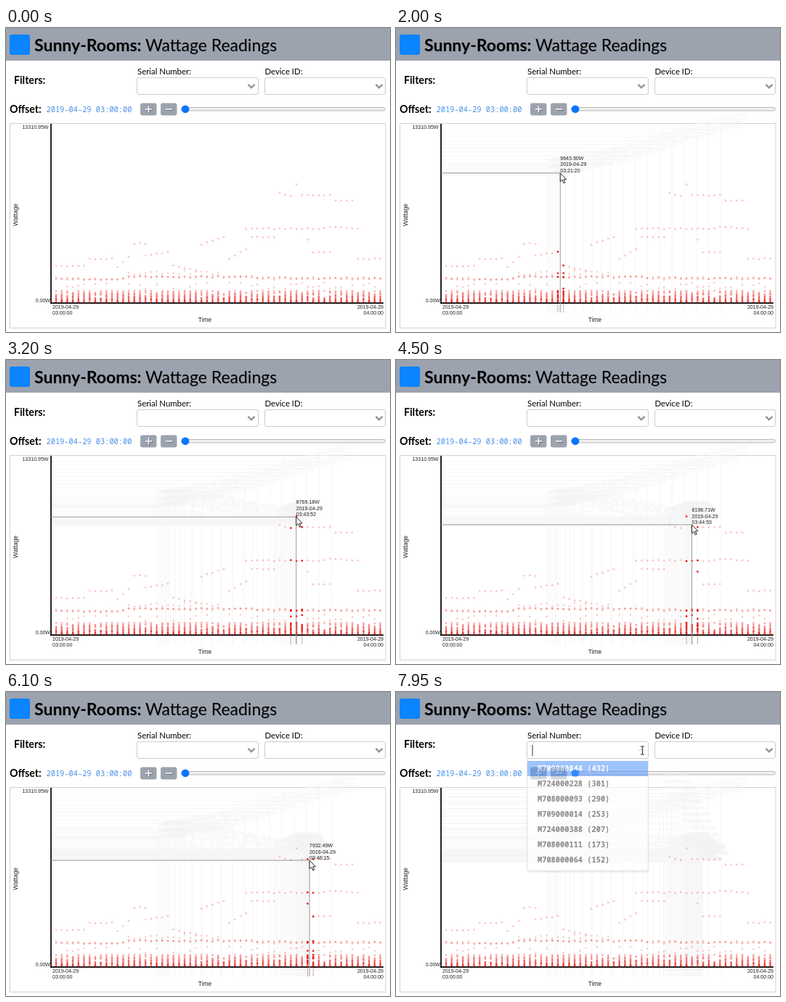
Write an HTML page that moves like this. It is 529 px wide and 419 px high and loops after 8000 ms.

```html
<!DOCTYPE html>
<html lang="en">
<head>
<meta charset="utf-8">
<title>Wattage Readings</title>
<style>
  html, body { margin: 0; width: 100%; height: 100%; overflow: hidden; background: #fff; }
  svg { display: block; width: 529px; height: 419px; }
  text { font-family: Lato, sans-serif; white-space: pre; }
  .mono { font-family: "Noto Sans Mono", monospace; font-size: 10.35px; }
  .tiny { font-family: "Liberation Sans", Arial, sans-serif; font-size: 7.05px; fill: #222; }
  .axis { font-family: "Liberation Sans", Arial, sans-serif; font-size: 8.4px; fill: #222; }
  .end { text-anchor: end; }
  .middle { text-anchor: middle; }
  .head { font-size: 14.2px; font-weight: 700; }
  .name { font-size: 11.4px; }
  .box { fill: #fff; stroke: #ccc; }
  .chevron { fill: none; stroke: #959595; stroke-width: 2.5; }
  .title { font-size: 23px; text-shadow: 1px 1px 0 rgba(0, 0, 0, .12); }
  .button { fill: #9ca3af; }
  .plus { stroke: #fff; stroke-width: 1.6; filter: drop-shadow(1px 1px 0 rgba(0, 0, 0, .4)); }
  .trail path { fill: none; stroke: #f6f6f6; }
  .trail text { fill: #f3f3f3; }
  .column circle { fill: #f01414; }
  .column path { stroke: #c9aaaa; visibility: hidden; }
  .column.on circle { opacity: 1; }
  .column.on path { visibility: visible; }
</style>
</head>
<body>
<svg viewBox="0 0 529 419">
  <rect width="529" height="45" fill="#9ca3af"/>
  <rect x="5" y="9" width="28" height="28" rx="3" fill="#0a84ff"/>
  <text class="title" x="39" y="31.5" font-weight="700">Sunny-Rooms:</text>
  <text class="title" x="192" y="31.5">Wattage Readings</text>

  <text class="head" x="11" y="77">Filters:</text>
  <text class="name" x="181" y="64">Serial Number:</text>
  <text class="name" x="356.5" y="64">Device ID:</text>
  <rect class="box" x="180.5" y="68.5" width="167" height="23" rx="2.5"/>
  <rect class="box" x="356.5" y="68.5" width="166" height="23" rx="2.5"/>
  <g transform="translate(338 80)"><path id="chevron" class="chevron" d="M-4.5-2.2L0 2.3L4.5-2.2"/></g>
  <path class="chevron" d="M509.5 77.8L514 82.3L518.5 77.8"/>

  <text class="head" x="5" y="117">Offset:</text>
  <text class="mono" x="55.5" y="115.5" fill="#4a90e8">2019-04-29 03:00:00</text>
  <rect class="button" x="185" y="103.5" width="22.5" height="17" rx="3"/>
  <rect class="button" x="213" y="103.5" width="22.5" height="17" rx="3"/>
  <path class="plus" d="M192 112h9M196.5 107.5v9M220 112h9"/>
  <rect x="241.5" y="109.5" width="281" height="4.5" rx="2.25" fill="#efefef" stroke="#b8b8b8"/>
  <circle cx="247" cy="111.8" r="5.4" fill="#0a75ff"/>

  <rect x="5.5" y="131.5" width="517.5" height="282" fill="#fff" stroke="#d3d3d3"/>
  <g id="trails"></g>
  <path d="M62 132V380M61 379.2H520" fill="none" stroke="#000" stroke-width="1.7"/>
  <g id="columns"></g>
  <text class="tiny end" x="58.5" y="139">13310.95W</text>
  <text class="tiny end" x="61" y="378">0.00W</text>
  <text class="tiny" x="64" y="386.5">2019-04-29</text>
  <text class="tiny" x="64" y="395">03:00:00</text>
  <text class="tiny end" x="520" y="386.5">2019-04-29</text>
  <text class="tiny end" x="520" y="395">04:00:00</text>
  <text class="axis middle" transform="translate(15.5 257.5) rotate(-90)">Wattage</text>
  <text class="axis middle" x="274" y="405">Time</text>

  <g id="cross"></g>
  <g id="menu">
    <rect x="181" y="94" width="167" height="155" rx="3" opacity=".1"/>
    <rect class="box" x="180.5" y="91.5" width="167" height="155" rx="2.5"/>
    <rect x="181" y="95" width="166" height="21" fill="#5897fb"/>
  </g>
  <path id="caret" d="M188 73V88" stroke="#333"/>
  <path id="arrow" d="M0 0V12L2.8 9.4L4.8 14L6.6 13.2L4.7 8.8H8.4Z" fill="#fff" stroke="#111" stroke-width=".9"/>
  <path id="beam" d="M-2.5-5.5H2.5M0-5V5M-2.5 5.5H2.5" fill="none" stroke="#222"/>
</svg>
<script>
const LOOP = 8000, STEP = 50, MAX = 13310.95, ENTER = 350, OPEN = 7800;
const $ = id => document.getElementById(id);
const show = (el, on) => { el.style.display = on ? "" : "none"; };
const add = (parent, tag, attrs, text = "") => {
  const el = document.createElementNS("http://www.w3.org/2000/svg", tag);
  for (const key in attrs) el.setAttribute(key, attrs[key]);
  el.textContent = text;
  return parent.appendChild(el);
};

// Pointer moves: start ms, end ms, then the goal in seconds after 03:00 and watts.
const moves = [
  [350, 550, 3008, 12832], [550, 1000, 1819, 10366.5], [1000, 1350, 1138, 9477],
  [1650, 2000, 1280, 9643.9], [2000, 2500, 2392, 8146], [2500, 3200, 2632, 8769.18],
  [4050, 4500, 2693, 8198.71], [5150, 5650, 2758, 7932.49], [5950, 6100, 2775, 7932.49],
  [6100, 6350, 2809, 7773], [6900, 7750, 2158, 16026]
];

function pointAt(t) {
  let sec = 3577, watts = 16559;
  for (const [from, to, s, w] of moves) {
    const k = Math.min(1, Math.max(0, (t - from) / (to - from)));
    sec += (s - sec) * k;
    watts += (w - watts) * k;
  }
  return { sec, watts, x: 62 + sec * .12833, y: 131 + (MAX - watts) / 53.25 };
}

const inside = (t, p) => t >= ENTER && p.y > 132;
const two = n => String(Math.floor(n)).padStart(2, "0");

function drawCross(el, p, stroke) {
  el.replaceChildren();
  add(el, "path", { d: `M62 ${p.y}H${p.x}V392`, fill: "none", stroke });
  [p.watts.toFixed(2) + "W", "2019-04-29", `03:${two(p.sec / 60)}:${two(p.sec % 60 + .001)}`]
    .forEach((line, i) => add(el, "text", { class: "tiny", x: p.x, y: p.y - 18 + i * 8.5 }, line));
}

// Faint remains of earlier crosshairs.
const trails = [];
for (const [from, to] of moves) {
  for (let t = from; t < to; t += STEP) {
    const p = pointAt(t);
    if (!inside(t, p)) continue;
    const el = add($("trails"), "g", { class: "trail" });
    drawCross(el, p, "#f6f6f6");
    el.querySelectorAll("text").forEach(n => { n.style.fill = "#f3f3f3"; });
    trails.push({ t, el });
  }
}

let seed = 29;
const rand = () => (seed = seed * 16807 % 2147483647) / 2147483647;
const jitter = size => (rand() - .5) * size;

const columns = Array.from({ length: 59 }, (_, i) => {
  const x = 69 + i * 7.7;
  const el = add($("columns"), "g", { class: "column" });
  add(el, "path", { d: `M${x} 380V392` });
  return { x, el };
});
const dot = (i, cy, opacity = .25) =>
  add(columns[i].el, "circle", { cx: columns[i].x, cy, r: 1.35, opacity });

// A run of readings over neighbouring columns, from height y0 to y1.
function run(from, to, y0, y1 = y0) {
  for (let i = from; i <= to; i++) {
    dot(i, y0 + (y1 - y0) * (i - from) / (to - from || 1) + jitter(1.5));
  }
}
run(40, 42, 228, 231);
run(43, 43, 216);
run(44, 49, 230.5);
run(50, 53, 238.5);
run(34, 48, 276.5);
run(49, 54, 274, 277);
run(0, 5, 328);
run(6, 10, 318);
run(11, 13, 330, 315);
run(14, 16, 297);
run(16, 20, 313, 309);
run(21, 25, 328, 334);
run(26, 30, 298, 288);
run(31, 34, 318, 305);
run(35, 39, 288.5);
run(45, 45, 292);
run(46, 49, 309.5);
run(54, 58, 318);

// Crowded low readings, denser towards zero.
columns.forEach((_, i) => {
  const row = i < 13 ? 346 : i < 36 ? 343 : 345;
  dot(i, row + jitter(1.5), .3);
  dot(i, row + jitter(4), .25);
  if (i > 12 && i < 30) dot(i, 337 + jitter(6), .2);
  if (rand() < (i > 38 ? .9 : .5)) dot(i, 355 + jitter(9), .22);
  for (let k = 0; k < 7; k++) {
    if (k > 3 || rand() < .88) dot(i, 362.5 + k * 2.5 + jitter(.8), .35 + k * .09);
  }
});

["M709000844 (432)", "M724000228 (301)", "M708000093 (290)", "M709000014 (253)",
  "M724000388 (207)", "M708000111 (173)", "M708000064 (152)"].forEach((line, i) =>
  add($("menu"), "text", {
    class: "mono", x: 195, y: 108.7 + i * 21.1, "font-weight": 600, fill: i ? "#333" : "#fff"
  }, line));

function draw(now) {
  const t = Math.floor(now % LOOP / STEP) * STEP;
  const p = pointAt(t), over = inside(t, p);
  const open = t >= OPEN ? (t - OPEN + STEP) / 350 : 0;

  show($("cross"), over);
  drawCross($("cross"), p, "#999");
  columns.forEach(c => c.el.classList.toggle("on", over && Math.abs(c.x - p.x) < 8.5));
  trails.forEach(trail => show(trail.el, trail.t < t));

  $("arrow").setAttribute("transform", `translate(${p.x} ${p.y})`);
  $("beam").setAttribute("transform", `translate(${p.x + .5} ${p.y + .5})`);
  show($("arrow"), t >= ENTER && t < OPEN - STEP);
  show($("beam"), t >= OPEN - STEP);

  show($("menu"), open > 0);
  show($("caret"), open > 0);
  $("menu").setAttribute("opacity", open);
  $("chevron").setAttribute("transform", `scale(1 ${1 - 2 * open})`);
}

const start = performance.now();
function tick() {
  draw(performance.now() - start);
  requestAnimationFrame(tick);
}
tick();
</script>
</body>
</html>
```
